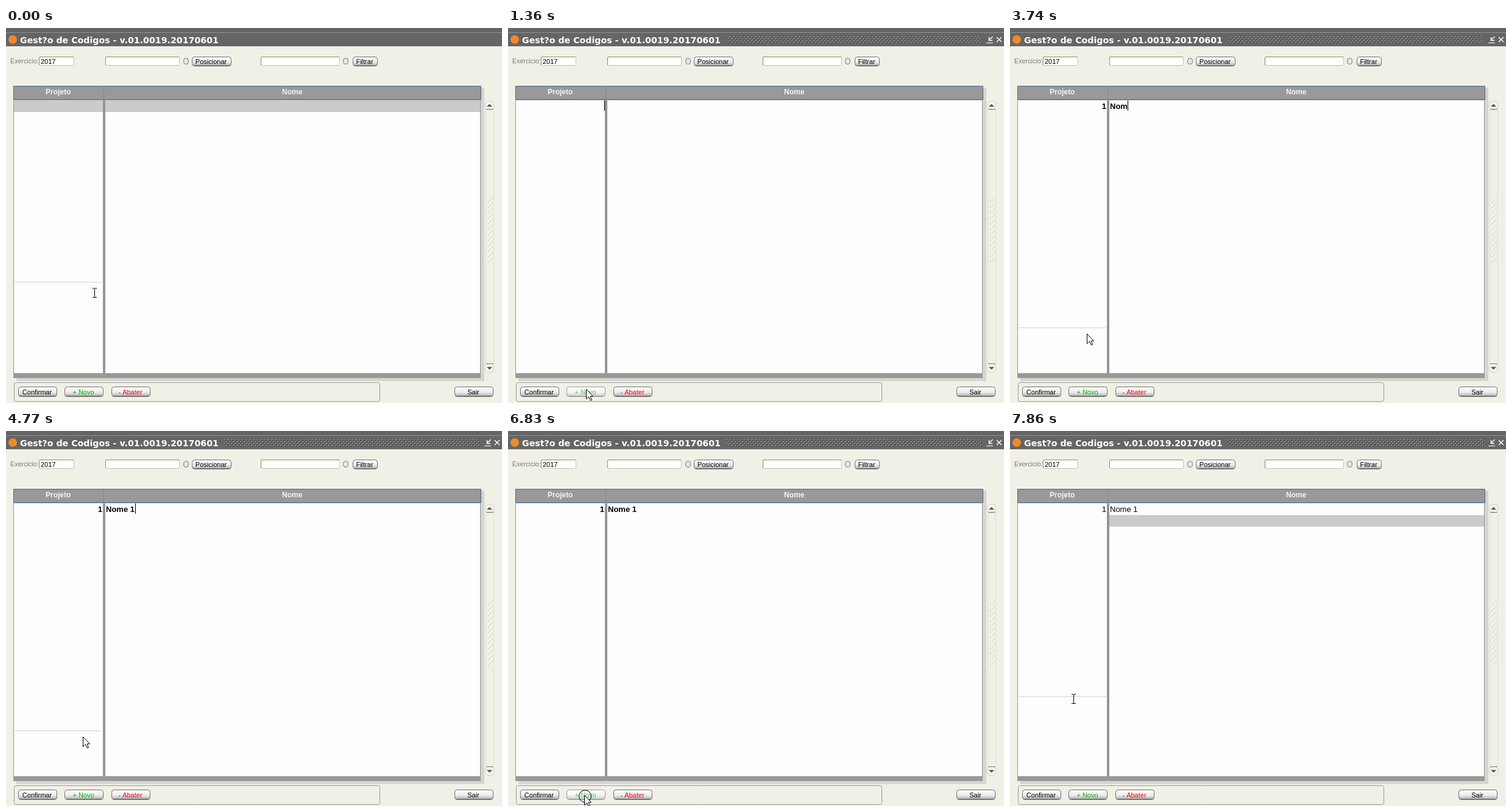
Write an HTML page with a canvas that moves like this. It is 814 by 616 pixels and loops after 8 s.

```html
<!DOCTYPE html>
<html lang="pt">
<head>
<meta charset="utf-8">
<title>Gest?o de Codigos</title>
<style>
html, body { margin: 0; width: 100%; height: 100%; overflow: hidden; background: #f0f0e7; }
canvas { display: block; }
</style>
</head>
<body>
<canvas id="stage" width="814" height="616"></canvas>
<script>
const ctx = document.getElementById('stage').getContext('2d');
const LOOP = 8000;
const SANS = '"Liberation Sans", Arial, sans-serif';

// Each step overrides parts of the state before it.
const steps = [
  { at: 0, selected: 1, line: 417, pointer: ['beam', 145, 435] },
  { at: 680, line: 513, pointer: ['beam', 138, 523] },
  { at: 1020, line: 0, pointer: ['arrow', 128, 593], hover: true },
  { at: 1360, selected: 0, active: true, caret: [158, 119] },
  { at: 2040, caret: null, hover: false, line: 492, pointer: ['beam', 128, 503] },
  { at: 2380, pointer: null },
  { at: 2720, code: '1', bold: true, caret: [158, 119] },
  { at: 3060, caret: [164, 119], pointer: ['arrow', 126, 502] },
  { at: 3740, name: 'Nom', caret: [193, 119] },
  { at: 4080, name: 'Nome ', caret: [205, 119] },
  { at: 4770, name: 'Nome 1', caret: [212, 119] },
  { at: 5450, caret: null, marked: true },
  { at: 6490, line: 0, pointer: ['arrow', 124, 578] },
  { at: 6830, marked: false, hover: true, click: true, pointer: ['arrow', 125, 598] },
  { at: 7180, click: false, bold: false, selected: 2, caret: [158, 138] },
  { at: 7510, hover: false, line: 436, pointer: ['beam', 104, 440] },
  { at: 7860, caret: null }
];

function rect(x, y, w, h, color) {
  ctx.fillStyle = color;
  ctx.fillRect(x, y, w, h);
}

function outline(x, y, w, h, r, stroke, fill) {
  ctx.beginPath();
  ctx.roundRect(x + .5, y + .5, w - 1, h - 1, r);
  if (fill) { ctx.fillStyle = fill; ctx.fill(); }
  ctx.lineWidth = 1;
  ctx.strokeStyle = stroke;
  ctx.stroke();
}

function text(str, x, y, color = '#000', font = '11px ' + SANS, align = 'left') {
  ctx.font = font;
  ctx.textAlign = align;
  ctx.fillStyle = color;
  ctx.fillText(str, x, y);
}

function path(points, color, fill) {
  ctx.beginPath();
  points.forEach(([x, y]) => ctx.lineTo(x, y));
  if (fill) { ctx.closePath(); ctx.fillStyle = fill; ctx.fill(); }
  ctx.strokeStyle = color;
  ctx.stroke();
}

function field(x, w, value) {
  outline(x, 47, w, 15, 2, '#c2c3b4', '#fff');
  rect(x + 1, 47, w - 2, 1, '#87944f');
  rect(x, 48, 1, 13, '#87944f');
  text(value, x + 3, 59);
}

function button(label, x, y, w, h, color = '#000', hover = false) {
  const shade = ctx.createLinearGradient(0, y, 0, y + h);
  shade.addColorStop(0, '#fff');
  shade.addColorStop(.55, hover ? '#f4f4f4' : '#ececec');
  shade.addColorStop(1, hover ? '#c4c4c4' : '#a4a4a4');
  outline(x, y, w, h, 4, hover ? '#9a9a9a' : '#707070', shade);
  rect(x + 3, y + h - 2, w - 6, 1, hover ? '#aaa' : '#777');
  text(label, x + w / 2 - 1, y + h - 4, color, undefined, 'center');
}

function bump(x, y, light, dark) {
  rect(x, y, 1, 1, light);
  rect(x + 1, y + 1, 1, 1, dark);
}

function titleBar(active) {
  rect(0, 0, 814, 30, '#656565');
  rect(0, 7, 814, 1, '#929292');
  ctx.beginPath();
  ctx.arc(11, 19, 7, 0, 7);
  ctx.fillStyle = '#f08a28';
  ctx.fill();
  text('Gest?o de Codigos - v.01.0019.20170601', 23, 25, '#fff',
    'bold 14.2px "DejaVu Sans", Verdana, sans-serif');
  if (!active) return;
  for (let row = 0; row < 4; row++)
    for (let x = 358 + row % 2 * 3; x < 777; x += 6)
      bump(x, 14 + row * 3, '#f0f0f0', '#111');
  ctx.lineWidth = 1.5;
  path([[795.5, 14], [790, 19.5]], '#fff');
  path([[789.5, 15], [789.5, 20.5], [795, 20.5]], '#fff');
  rect(785, 24, 11, 1, '#fff');
  path([[802, 15], [810, 23]], '#fff');
  path([[810, 15], [802, 23]], '#fff');
}

function scrollButton(y, up) {
  outline(786, y, 15, 15, 5, '#cfcfb6', '#f5f5ed');
  const base = up ? y + 9 : y + 6, tip = up ? y + 5 : y + 10;
  ctx.lineWidth = .5;
  path([[789.5, base], [797.5, base], [793.5, tip]], '#555', '#555');
  rect(788, up ? y + 13 : y, 12, 1, '#777');
}

function scrollBar() {
  rect(787, 134, 1, 417, '#deded0');
  rect(800, 134, 1, 417, '#deded0');
  scrollButton(120, true);
  scrollButton(551, false);
  // Grip: short diagonals of three bumps.
  for (let y = 278; y < 380; y += 9)
    for (let i = 0; i < 3; i++)
      bump(796 - i * 3, y + i * 3, '#fff', '#8c8c84');
}

function table(s) {
  rect(779, 98, 6, 482, '#d6d6ce');
  rect(17, 575, 768, 5, '#d6d6ce');
  rect(12, 118, 767, 457, '#8e9196');
  rect(13, 118, 765, 1, '#b4bcc8');
  rect(13, 119, 146, 448, '#fefefe');
  rect(163, 119, 615, 448, '#fefefe');
  rect(159, 119, 4, 448, '#92959c');
  rect(12, 567, 767, 8, '#999');
  outline(12, 95, 768, 23, 0, '#44699a', '#999');
  rect(160, 97, 1, 20, '#85888e');
  text('Projeto', 65, 109, '#f4f4f4', 'bold 12px ' + SANS);
  text('Nome', 453, 109, '#f4f4f4', 'bold 12px ' + SANS);

  if (s.selected) {
    const y = s.selected === 1 ? 119 : 138;
    rect(163, y, 615, 19, '#cbcbcb');
    if (s.selected === 1) rect(13, y, 146, 19, '#cbcbcb');
  }
  if (s.marked) rect(151, 119, 7, 17, '#0000dd');
  const font = (s.bold ? 'bold ' : '') + '13px ' + SANS;
  text(s.code || '', 158, 133, s.marked ? '#fff' : '#000', font, 'right');
  text(s.name || '', 164, 133, '#000', font);
  if (s.caret) rect(...s.caret, 1, 17, '#000');
  if (s.line) rect(14, s.line, 144, 1, '#d2d2d2');
}

function drawPointer([kind, x, y]) {
  if (kind === 'beam') {
    rect(x, y - 7, 1, 15, '#000');
    for (const end of [y - 8, y + 7]) {
      rect(x - 3, end, 3, 1, '#000');
      rect(x + 1, end, 3, 1, '#000');
    }
    return;
  }
  const shape = [[0, 0], [0, 16], [4, 12.5], [7, 18.5], [9, 17.5], [6.5, 11.5], [11, 11.5]];
  ctx.lineWidth = 1;
  path(shape.map(([dx, dy]) => [x + dx + .5, y + dy + .5]), '#000', '#fff');
}

function draw(s) {
  rect(0, 0, 814, 616, '#f0f0e7');
  titleBar(s.active);
  text('Exercicio:', 7, 58, '#7b7b7b', '10.8px ' + SANS);
  field(54, 58, '2017');
  field(163, 122, '');
  field(418, 130, '');
  outline(291, 49, 9, 11, 4, '#777', '#e6e6e6');
  outline(553, 49, 9, 11, 4, '#777', '#e6e6e6');
  button('Posicionar', 305, 47, 65, 16);
  button('Filtrar', 569, 47, 41, 16);
  table(s);
  scrollBar();
  outline(13, 582, 601, 32, 3, '#9a9a98');
  button('Confirmar', 20, 589, 64, 17);
  button('+ Novo', 96, 589, 64, 17, s.hover ? '#4fc84f' : '#00b400', s.hover);
  button('- Abater', 173, 589, 64, 17, '#f00');
  button('Sair', 736, 589, 64, 17);
  if (s.click) {
    ctx.beginPath();
    ctx.arc(126.5, 600, 10, 0, 7);
    ctx.lineWidth = 1;
    ctx.strokeStyle = '#000';
    ctx.stroke();
  }
  if (s.pointer) drawPointer(s.pointer);
}

function tick() {
  const t = performance.now() % LOOP;
  draw(Object.assign({}, ...steps.filter(step => step.at <= t)));
  requestAnimationFrame(tick);
}
tick();
</script>
</body>
</html>
```
